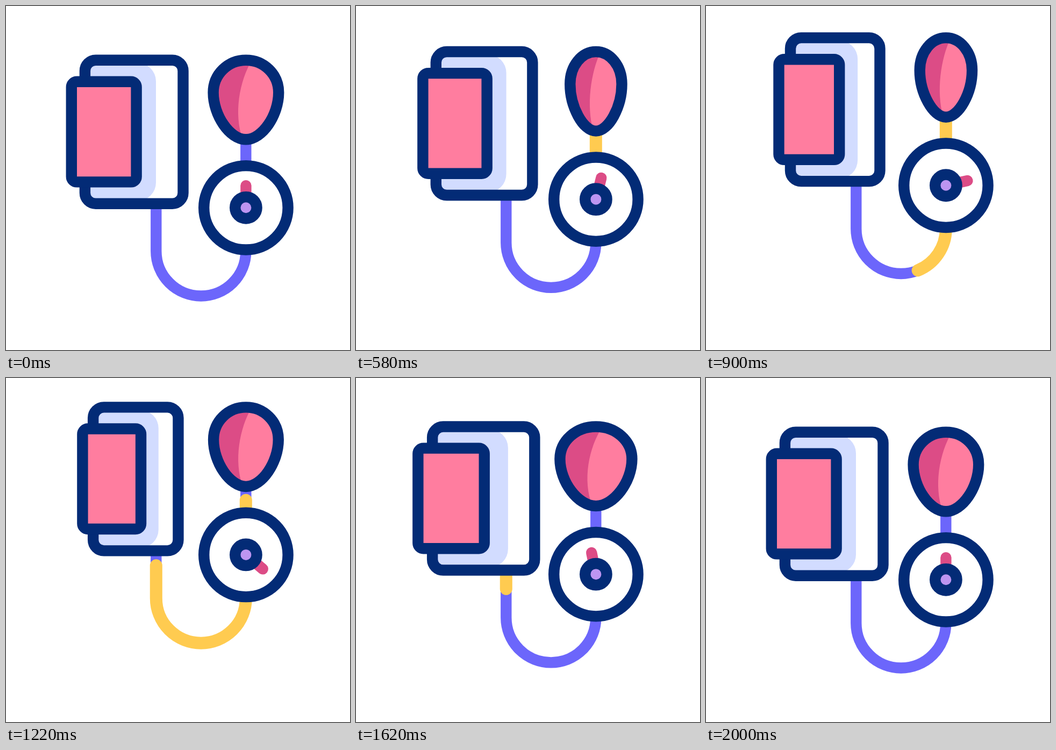
These frames come from a looping animation (640x640 px, 2.34 s). An HTML page:

```html
<!DOCTYPE html>
<html lang="en">
<head>
<meta charset="utf-8">
<title>Blood pressure monitor</title>
<style>
  html, body { margin: 0; width: 100%; height: 100%; overflow: hidden; background: #fff; }
  svg { display: block; width: 100%; height: 100%; }
  .line { stroke: #032b76; stroke-width: 20.4; stroke-linejoin: round; }
  .tube { fill: none; stroke: #6c66fb; stroke-width: 20.4; }
  .air { stroke: #ffcb50; stroke-width: 23; stroke-linecap: round; }
  .pink { fill: #ff7d9f; }
  .shade { fill: #dc4c86; }
  .needle { stroke: #dc4c86; stroke-width: 20.4; stroke-linecap: round; }
</style>
</head>
<body>
<svg viewBox="0 0 640 640">
  <g id="device">
    <path class="tube" d="M446.3 240V456A83.5 83.5 0 0 1 279.3 456V360"/>
    <path id="air" class="tube air" d="M446.3 240V456A83.5 83.5 0 0 1 279.3 456V340"/>
    <rect id="bodyFill" y="100.7" height="267" rx="20" fill="#fff"/>
    <path id="panel" fill="#d2dcff"/>
    <rect id="body" class="line" y="100.7" height="267" rx="20" fill="none"/>
    <rect id="cuff" class="line pink" y="140.8" height="186.6" rx="10"/>
    <path id="bulb" class="pink"/>
    <path id="bulbShade" class="shade"/>
    <path id="bulbLine" class="line" fill="none"/>
    <g transform="translate(446.4 375.3)">
      <circle class="line" r="78.2" fill="#fff"/>
      <path id="needle" class="needle" d="M0 0V-41"/>
      <circle class="line" r="20.2" fill="#bd95f1"/>
    </g>
  </g>
</svg>
<script>
const LOOP = 2340;

// Each track is a list of [time, value].
const tracks = {
  lift: [[200, 0], [400, 29], [580, -15.5], [740, -32.5], [900, -41.5], [1210, -46.8],
         [1460, 30], [1620, -10], [1720, -19], [2000, 0]],
  squash: [[400, 0], [1220, 20.6], [1490, -16.5], [1620, -6.5], [1780, 0]],
  needle: [[400, 0], [1300, 133], [1620, -11.5], [1880, 0]],
  bulb: [[400, 0], [670, -17], [1240, 0], [1600, 6.3], [1860, 0]],
  head: [[451, 0], [1300, 594]],
  tail: [[1194, 0], [1652, 570]]
};

// Smooth curve through the keys, flat at the turning points.
function sample(keys, t) {
  const last = keys.length - 1;
  if (t <= keys[0][0]) return keys[0][1];
  if (t >= keys[last][0]) return keys[last][1];
  const i = keys.findIndex(k => k[0] > t) - 1;
  const rate = n => (keys[n + 1][1] - keys[n][1]) / (keys[n + 1][0] - keys[n][0]);
  const slope = n => {
    if (n === 0 || n === last) return 0;
    const a = rate(n - 1), b = rate(n);
    return a * b > 0 ? 2 * a * b / (a + b) : 0;
  };
  const [t0, v0] = keys[i], [t1, v1] = keys[i + 1];
  const d = t1 - t0, u = (t - t0) / d, w = 1 - u;
  return v0 * w * w * (1 + 2 * u) + v1 * u * u * (3 - 2 * u)
       + d * u * w * (slope(i) * w - slope(i + 1) * u);
}

function linear([[t0, v0], [t1, v1]], t) {
  const u = Math.min(1, Math.max(0, (t - t0) / (t1 - t0)));
  return v0 + (v1 - v0) * u;
}

const $ = id => document.getElementById(id);
const set = (id, attrs) => {
  for (const name in attrs) $(id).setAttribute(name, attrs[name]);
};

function drawCuff(q) {
  const left = 146.9 + q * 0.74, right = 329.5 - q * 0.44;
  const box = { x: left, width: right - left };
  set('bodyFill', box);
  set('body', box);
  const edge = 279 + (q > 0 ? q * 0.23 : -q * 0.6);
  set('panel', {
    d: `M${left} 106H${edge - 34}a34 34 0 0 1 34 34V328.4a34 34 0 0 1 -34 34H${left}Z`
  });
  const x = 121.8 + q;
  set('cuff', { x, width: 242.6 + q * (q > 0 ? 0.41 : 0.6) - x });
}

function drawBulb(w) {
  const x = k => 446.4 + k * w;
  const side = s => `C${x(s * 0.5)} 248.3 ${x(s)} 203 ${x(s)} 161C${x(s)} 127 ${x(s * 0.55)} 100.7 ${x(0)} 100.7`;
  const start = `M${x(0)} 248.3`;
  const outline = `${start}${side(-1)}C${x(0.55)} 100.7 ${x(1)} 127 ${x(1)} 161C${x(1)} 203 ${x(0.5)} 248.3 ${x(0)} 248.3Z`;
  set('bulb', { d: outline });
  set('bulbLine', { d: outline });
  set('bulbShade', {
    d: `${start}${side(-1)}H${x(0.18)}C${x(-0.2)} 140 ${x(-0.38)} 200 ${x(-0.1)} 248.3Z`
  });
}

function drawAir(t) {
  const head = linear(tracks.head, t), tail = linear(tracks.tail, t);
  const visible = head > tail && t < tracks.tail[1][0];
  set('air', {
    visibility: visible ? 'visible' : 'hidden',
    'stroke-dasharray': `${Math.max(0, head - tail)} 2000`,
    'stroke-dashoffset': -tail
  });
}

function draw(t) {
  set('device', { transform: `translate(0 ${sample(tracks.lift, t)})` });
  drawCuff(sample(tracks.squash, t));
  drawBulb(60.8 + sample(tracks.bulb, t));
  drawAir(t);
  set('needle', { transform: `rotate(${sample(tracks.needle, t)})` });
}

const begin = performance.now();
function tick() {
  draw((performance.now() - begin) % LOOP);
  requestAnimationFrame(tick);
}
tick();
</script>
</body>
</html>
```
